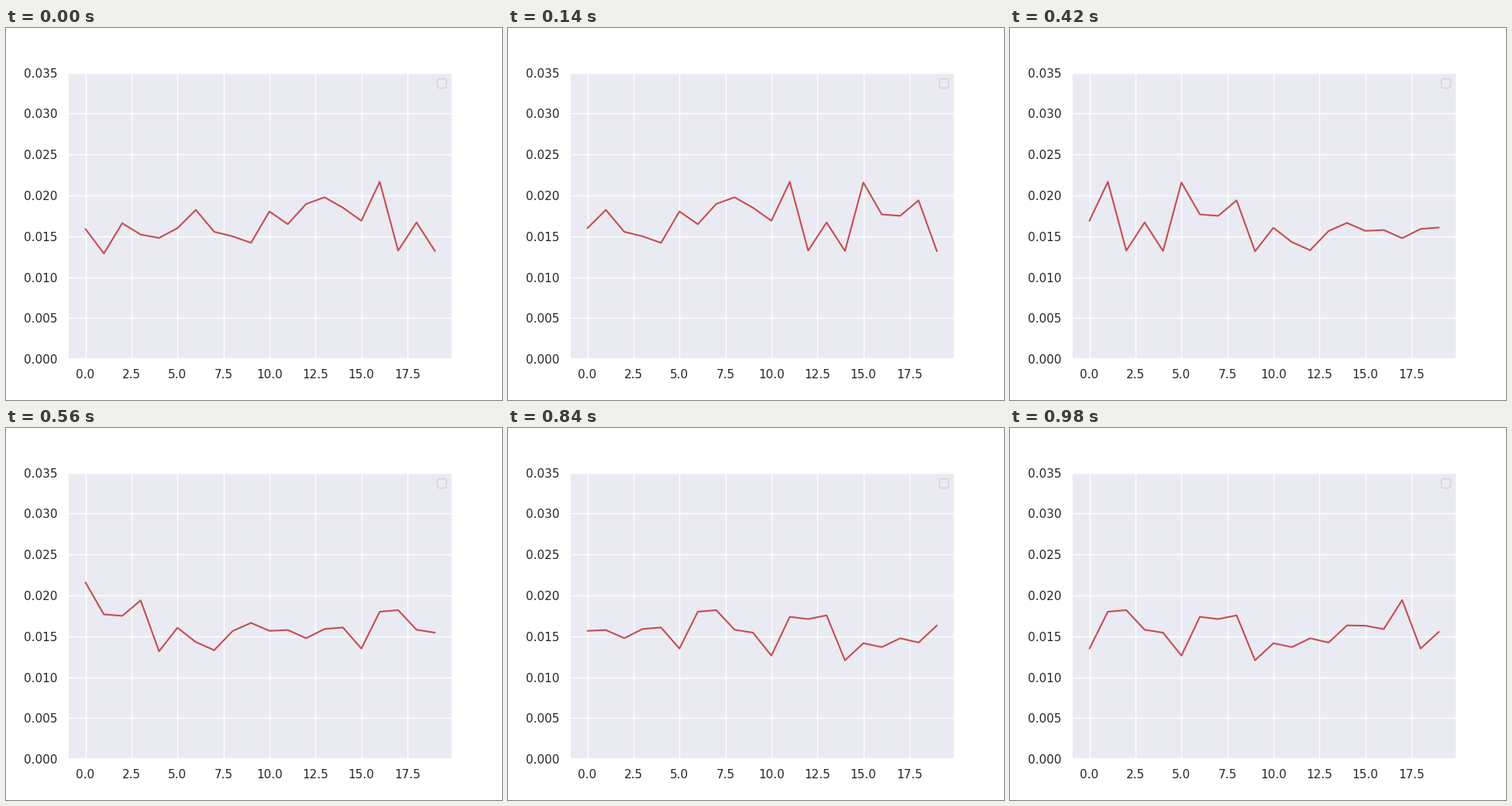
These frames come from a looping animation (640 px wide and 480 px high, 1.12 s). A matplotlib script:

```python
import matplotlib.pyplot as plt
import numpy as np
from matplotlib.animation import FuncAnimation

WINDOW, STEP, FRAMES, INTERVAL = 20, 5, 8, 140

plt.rcParams.update({
    "font.family": "DejaVu Sans",
    "axes.facecolor": "#EAEAF2",
    "axes.edgecolor": "white",
    "axes.linewidth": 1.25,
    "axes.axisbelow": True,
    "axes.grid": True,
    "grid.color": "white",
    "grid.linewidth": 1,
    "lines.solid_capstyle": "round",
    "legend.fontsize": 11,
})

# Series in units of 1e-5; each frame shows the next window of it.
series = np.array([
    1590, 1290, 1660, 1522, 1480, 1600, 1823, 1555, 1500, 1420,
    1804, 1648, 1896, 1977, 1849, 1690, 2166, 1325, 1670, 1320,
    2158, 1768, 1750, 1939, 1317, 1605, 1430, 1330, 1565, 1664,
    1567, 1577, 1477, 1590, 1608, 1350, 1801, 1820, 1580, 1545,
    1264, 1738, 1711, 1756, 1207, 1416, 1368, 1476, 1424, 1633,
    1630, 1588, 1943, 1350, 1555,
]) / 1e5

fig = plt.figure(figsize=(6.4, 4.8), dpi=100, facecolor="white")
ax = fig.add_axes([0.125, 0.11, 0.775, 0.77])
ax.set(xlim=(-0.95, 19.95), ylim=(0, 0.035),
       xticks=np.arange(0, 18, 2.5), yticks=np.linspace(0, 0.035, 8))
ax.xaxis.set_major_formatter("{x:.1f}")
ax.yaxis.set_major_formatter("{x:.3f}")
ax.tick_params(length=6, pad=3.5, labelsize=11, labelcolor="0.15",
               bottom=False, left=False)
ax.legend([], [], loc="upper right")

line, = ax.plot(np.arange(WINDOW), series[:WINDOW], color="#C44E52", lw=1.5)


def update(frame):
    start = frame * STEP
    line.set_ydata(series[start:start + WINDOW])
    return line,


anim = FuncAnimation(fig, update, frames=FRAMES, interval=INTERVAL,
                     repeat=True, repeat_delay=0)
plt.show()
```
